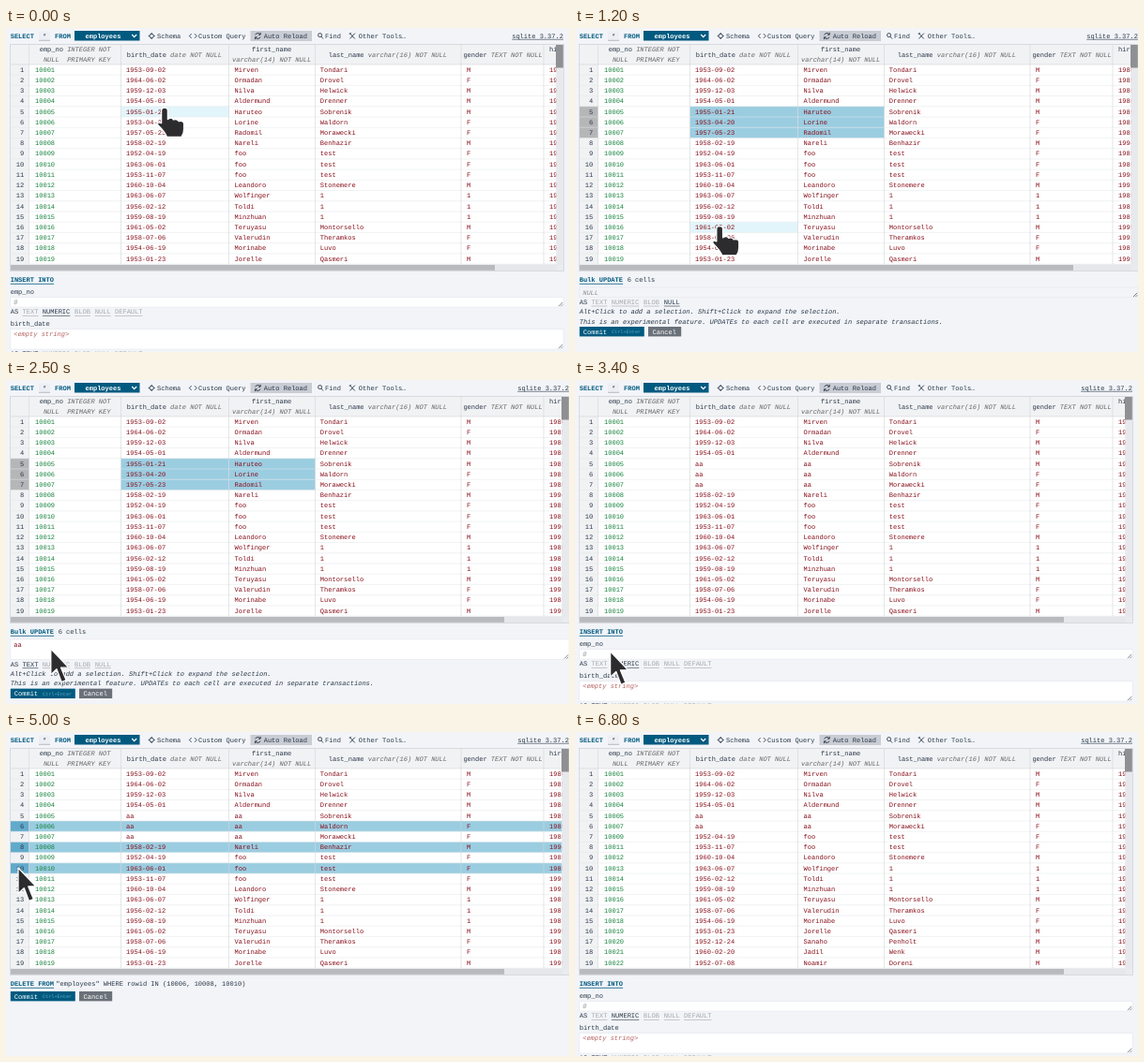
Animation of 600 by 346 pixels, one loop 6850 ms. Source, as an HTML page:

```html
<!DOCTYPE html>
<html lang="en">
<head>
<meta charset="utf-8">
<style>
html, body { margin: 0; width: 100%; height: 100%; overflow: hidden; background: #f2f4f8; }
svg { display: block; width: 600px; height: 346px; }
text { font: 7.03px "Liberation Mono", monospace; text-rendering: geometricPrecision; fill: #273646; white-space: pre; }
.b { font-weight: bold; }
.i { font-style: italic; }
.teal { fill: #005a7f; }
.white { fill: #fff; }
.num { fill: #14803c; }
.str { fill: #850d18; }
.type { fill: #666; font-style: italic; }
.off { fill: #a3a7ad; }
.hint { fill: #8a8f96; font-style: italic; }
.empty { fill: #b3605f; font-style: italic; }
.key { fill: #62a5c2; font-size: 5.2px; }
.icon { fill: none; stroke: #273646; stroke-width: .9; }
</style>
</head>
<body>
<svg viewBox="0 0 600 346">
  <defs><clipPath id="clip"><rect id="clipBox" x="5" y="18" height="235"/></clipPath></defs>
  <g id="scene"></g>
  <g id="cursor" stroke="#fff" stroke-width="1.3" stroke-linejoin="round" fill="#2c2c2e"><path/></g>
</svg>
<script>
const LOOP = 6850, CHAR = 4.22, TOP = 38.9, PITCH = 11.22, ROWS = 19;
const scene = document.getElementById('scene');
const cursor = document.getElementById('cursor');
const clipBox = document.getElementById('clipBox');

const edges = [24.5, 122.5, 237.5, 329.5, 485, 573, 660];
const textX = [31, 128, 243.6, 334.8, 491, 579];
const people = `10001 1953-09-02 Mirven Tondari M 1986
10002 1964-06-02 Ormadan Drovel F 1985
10003 1959-12-03 Nilva Helwick M 1986
10004 1954-05-01 Aldermund Drenner M 1986
10005 1955-01-21 Haruteo Sobrenik M 1989
10006 1953-04-20 Lorine Waldorn F 1989
10007 1957-05-23 Radomil Morawecki F 1989
10008 1958-02-19 Nareli Benhazir M 1994
10009 1952-04-19 foo test F 1985
10010 1963-06-01 foo test F 1989
10011 1953-11-07 foo test F 1990
10012 1960-10-04 Leandoro Stonemere M 1992
10013 1963-06-07 Wolfinger 1 1 1985
10014 1956-02-12 Toldi 1 1 1987
10015 1959-08-19 Minzhuan 1 1 1987
10016 1961-05-02 Teruyasu Montorsello M 1995
10017 1958-07-06 Valerudin Theramkos F 1993
10018 1954-06-19 Morinabe Luvo F 1987
10019 1953-01-23 Jorelle Qasmeri M 1999
10020 1952-12-24 Sanaho Penholt M 1999
10021 1960-02-20 Jadil Wenk M 1988
10022 1952-07-08 Noamir Doreni M 1995`.split('\n').map(line => line.split(' '));

// Moments at which the interface changes
const AT = { press: 150, bulk: 300, text: 1800, key1: 2350, key2: 2500, commit: 3200, del: 3950, remove: 5650 };
const picks = [[AT.del, '10006'], [4450, '10008'], [4850, '10010']];

const path = [
  [0, 169, 86], [150, 169, 86], [600, 316, 111], [850, 316, 111], [1500, 27, 292], [1900, 27, 292],
  [2100, 48, 285], [2450, 48, 285], [2850, 43, 333], [3230, 43, 333], [3850, 14, 101], [4080, 14, 101],
  [4350, 14, 123], [4520, 14, 123], [4780, 13, 145], [5030, 13, 145], [5420, 57, 285], [5700, 57, 285], [6200, -30, 312]
];
const ARROW = 'M0 0V27.5L6.2 21.6 11.4 35.5 16.4 33.4 10.8 20H19Z';
const HAND = 'M-3.4 2.6Q-3.4-.8 0-.8 3.4-.8 3.4 2.6V11.5Q7-9.2 7 10.5 9 9.6 9.4 12 13.6 10.4 15 13.6 20 12.4 20.6 16V22Q20.6 27 18 30.5H2.5Q.5 25-7 17.8-8.6 13.4-3.4 15.6Z'.replace('Q7-9.2 7 10.5 9 9.6 9.4 12', 'Q8 8.6 9.4 12');

function pointer(t) {
  const n = path.findIndex(p => p[0] > t);
  if (n < 0) return path[path.length - 1].slice(1);
  const a = path[n - 1], b = path[n], u = (t - a[0]) / (b[0] - a[0]), s = u * u * (3 - 2 * u);
  return [1, 2].map(k => a[k] + (b[k] - a[k]) * s);
}

const escape = s => s.replace(/&/g, '&amp;').replace(/</g, '&lt;');
// y is the middle of the capital letters
const text = (x, y, s, cls = '', extra = '') => `<text x="${x}" y="${y + 2.3}" class="${cls}" ${extra}>${escape(s)}</text>`;
const rect = (x, y, w, h, fill, extra = '') => `<rect x="${x}" y="${y}" width="${w}" height="${h}" fill="${fill}" ${extra}/>`;
const line = (x1, y1, x2, y2, color, w = .6) => `<path d="M${x1} ${y1}L${x2} ${y2}" stroke="${color}" stroke-width="${w}"/>`;
const icon = d => `<path class="icon" d="${d}"/>`;

function toolbar(W) {
  return text(4.7, 8.3, 'SELECT', 'b teal') + rect(35, 3.5, 12, 9.7, '#eceff4') + line(35, 13.3, 47, 13.3, '#8b939d')
    + text(39, 8.8, '*') + text(52, 8.3, 'FROM', 'b teal')
    + rect(73, 3, 69.5, 10.5, '#005a7f') + text(84.5, 8.3, 'employees', 'b white')
    + '<path d="M134.2 7L136.7 9.6 139.2 7" fill="none" stroke="#fff" stroke-width="1.2"/>'
    + rect(260.5, 3, 65.5, 11, '#c9ccd3')
    + icon('M153 8.5a2.2 2.2 0 1 0 4.4 0a2.2 2.2 0 1 0-4.4 0M155.2 5v1.2M155.2 10.8V12M151.7 8.5h1.2M157.5 8.5h1.2')
    + text(161, 8.3, 'Schema')
    + icon('M197.6 6.2L195.4 8.5 197.6 10.8M201 6.2L203.2 8.5 201 10.8') + text(205, 8.3, 'Custom Query')
    + icon('M265.7 7.4A2.9 2.9 0 0 1 271 7M271.2 4.8V7.2H268.9M271 9.6A2.9 2.9 0 0 1 265.7 10M265.5 12.2V9.8H267.8')
    + text(274.7, 8.3, 'Auto Reload')
    + icon('M332.6 7.6a2 2 0 1 0 4 0a2 2 0 1 0-4 0M336 9.2L338 11.5') + text(340, 8.3, 'Find')
    + icon('M366.3 5.5L371.7 11.5M371.9 5.6L366.5 11.4M366 6.8L367.7 5') + text(375.8, 8.3, 'Other Tools…')
    + text(W - 54.8, 8.3, 'sqlite 3.37.2') + line(W - 54.8, 12.3, W, 12.3, '#273646');
}

const heading = (x, y, name, type) =>
  `<text x="${x}" y="${y + 2.3}">${name}<tspan class="type">${type}</tspan></text>`;

function table(s) {
  const { W, rows, sel, hover } = s, right = W - 7.5, bottom = TOP + ROWS * PITCH;
  let out = rect(5, 18, right - 5, bottom - 18, '#fff') + rect(5, 18, right - 5, TOP - 18, '#f1f2f4')
    + rect(5, TOP, 19.5, bottom - TOP, '#f1f2f4');
  const cell = (r, c, fill) => rect(edges[c], TOP + r * PITCH, edges[c + 1] - edges[c], PITCH, fill);
  if (hover) out += cell(...hover, '#e2f5fa');
  if (sel) {
    for (let r = sel.r0; r <= sel.r1; r++) for (let c = 1; c <= sel.c1; c++) out += cell(r, c, '#9bcde1');
    out += rect(5, TOP + sel.r0 * PITCH, 19.5, (sel.r1 - sel.r0 + 1) * PITCH, '#b5b6b8');
  }
  rows.forEach((row, r) => {
    if (!s.picked.includes(row[0])) return;
    const y = TOP + r * PITCH;
    out += rect(24.5, y, right, PITCH, '#9bcde1') + rect(5, y, 19.5, PITCH, '#62aacb');
  });
  for (let r = 0; r <= ROWS; r++) out += line(5, TOP + r * PITCH, right, TOP + r * PITCH, r ? '#e3e4e6' : '#c9cbd0', .5);
  edges.forEach(x => out += line(x, 18, x, bottom, '#d3d5d9'));
  out += heading(35.7, 23, 'emp_no', ' INTEGER NOT') + heading(39.9, 34, '', 'NULL\u00a0 PRIMARY KEY')
    + heading(128.8, 29, 'birth_date', ' date NOT NULL')
    + heading(262, 23, 'first_name', '') + heading(241, 34, '', 'varchar(14) NOT NULL')
    + heading(343.7, 29, 'last_name', ' varchar(16) NOT NULL')
    + heading(487.4, 29, 'gender', ' TEXT NOT NULL') + heading(579, 23, 'hire_date', '');
  rows.forEach((row, r) => {
    const y = TOP + (r + .5) * PITCH - .1;
    out += text(19.2, y, String(r + 1), '', 'text-anchor="end"');
    row.forEach((value, c) => out += text(textX[c], y, value, c ? 'str' : 'num'));
  });
  return rect(4.5, 17.5, W - 4, 242, '#e9ebef', 'stroke="#d2d5db" stroke-width=".8"')
    + `<g clip-path="url(#clip)">${out}</g>`
    + rect(5, 253, right - 5, 5.8, '#e6e7ea') + rect(5, 253, W < 600 ? 516 : 526, 5.8, '#b9babd')
    + rect(right, 18, 7.5, 235, '#e8e9ec') + rect(right - .5, 18, 7.8, 24.5, '#8f9093');
}

function field(y, h, W, value, cls, fill = '#fff') {
  const b = y + h;
  return rect(4.8, y, W - 4.8, h, fill, 'stroke="#e1e4e9" stroke-width=".5"')
    + text(8.2, y + 5.4, value, cls)
    + icon(`M${W - 5} ${b - .8}L${W - .8} ${b - 5}M${W - 2.6} ${b - .8}L${W - .8} ${b - 2.6}`).replace('/>', ' style="stroke-width:.6"/>');
}

function types(y, active, names, hot) {
  const xs = [17.5, 38.8, 73, 94.8, 116];
  return text(4.7, y, 'AS') + names.map((name, k) => {
    const w = name.length * CHAR, on = name === active;
    return (hot && !k ? rect(xs[k] - .5, y - 4.5, w + 1, 9.5, '#c6dfea') : '')
      + text(xs[k], y, name, on ? '' : 'off') + line(xs[k], y + 4.4, xs[k] + w, y + 4.4, on ? '#273646' : '#a3a7ad');
  }).join('');
}

const title = s => text(4.7, 268.5, s, 'b teal') + line(4.7, 273.3, 4.7 + s.length * CHAR, 273.3, '#005a7f', .8);

const buttons = y => rect(4.8, y, 69, 10.4, '#005a7f') + text(8.8, y + 5.2, 'Commit', 'white')
  + text(39, y + 4.8, 'Ctrl+Enter', 'key') + rect(78, y, 35.2, 10.4, '#6b7179') + text(82.6, y + 5.2, 'Cancel', 'white');

function panel(s) {
  const { W } = s, kinds = ['TEXT', 'NUMERIC', 'BLOB', 'NULL'];
  if (s.view === 'insert') {
    const all = [...kinds, 'DEFAULT'];
    return title('INSERT INTO') + text(4.7, 282, 'emp_no') + field(287.5, 10.5, W, '0', 'hint') + types(303, 'NUMERIC', all)
      + text(4.7, 316, 'birth_date') + field(321.7, 21.3, W, '<empty string>', 'empty') + types(347.3, 'TEXT', all);
  }
  if (s.view === 'delete')
    return title('DELETE FROM') + text(53.3, 268.5, `"employees" WHERE rowid IN (${s.picked.join(', ')})`) + buttons(277);
  const d = s.asText ? 10.6 : 0;
  const box = !s.asText ? field(277, 10.8, W, 'NULL', 'hint', '#f2f4f8')
    : field(277, 21.4, W, s.typed || '<empty string>', s.typed ? 'str' : 'empty');
  return title('Bulk UPDATE') + text(55.7, 268.5, s.count + ' cells') + box
    + types(292.6 + d, s.asText ? 'TEXT' : 'NULL', kinds, s.hot)
    + text(4.7, 302.8 + d, 'Alt+Click to add a selection. Shift+Click to expand the selection.', 'i')
    + text(4.7, 313.4 + d, 'This is an experimental feature. UPDATEs to each cell are executed in separate transactions.', 'i')
    + buttons(319 + d);
}

function stateAt(t) {
  const [x, y] = pointer(t);
  const view = t < AT.bulk ? 'insert' : t < AT.commit ? 'update' : t < AT.del ? 'insert' : t < AT.remove ? 'delete' : 'insert';
  const s = { view, W: view === 'insert' ? 594 : 600, picked: [], asText: t >= AT.text };
  s.typed = t < AT.key1 ? '' : t < AT.key2 ? 'a' : 'aa';
  const rowAt = py => Math.floor((py - TOP) / PITCH);

  if (t >= AT.press && t < AT.commit) {
    const [ex, ey] = pointer(Math.min(t, 700));
    s.sel = { r0: 4, r1: Math.max(4, rowAt(ey)), c1: ex > edges[2] ? 2 : 1 };
    s.count = (s.sel.r1 - 3) * s.sel.c1;
  }
  if (view === 'delete') s.picked = picks.filter(p => t >= p[0]).map(p => p[1]);

  s.rows = people.map(p => t >= AT.commit && p[0] > '10004' && p[0] < '10008' ? [p[0], 'aa', 'aa', ...p.slice(3)] : p);
  if (t >= AT.remove) s.rows = s.rows.filter(p => !picks.some(k => k[1] === p[0]));
  s.rows = s.rows.slice(0, ROWS);

  const r = rowAt(y), inRows = r >= 0 && r < ROWS && x > 5 && x < s.W - 8;
  const c = edges.findIndex((e, k) => x >= e && x < edges[k + 1]);
  const selected = inRows && (s.picked.includes(s.rows[r][0])
    || s.sel && c > 0 && c <= s.sel.c1 && r >= s.sel.r0 && r <= s.sel.r1);
  const dragging = t >= AT.press && t < 850;
  const free = inRows && !selected && !dragging;
  if (free && c >= 0) s.hover = [r, c];

  const buttonY = view === 'delete' ? 277 : s.asText ? 329.6 : 319;
  const onButton = view !== 'insert' && x > 5 && x < 74 && y >= buttonY && y < buttonY + 10.4;
  const typeY = s.asText ? 303.2 : 292.6;
  s.hot = view === 'update' && x > 17 && x < 35 && Math.abs(y - typeY) < 5;
  return { s, x, y, hand: free || onButton || s.hot };
}

let last = '';
function render(t) {
  const { s, x, y, hand } = stateAt(t), key = JSON.stringify(s);
  if (key !== last) {
    last = key;
    clipBox.setAttribute('width', s.W - 12.5);
    scene.innerHTML = rect(0, 0, 600, 346, '#f2f4f8') + toolbar(s.W) + table(s) + panel(s);
  }
  cursor.setAttribute('transform', `translate(${x} ${y})`);
  cursor.firstElementChild.setAttribute('d', hand ? HAND : ARROW);
}

const start = performance.now();
function tick() {
  render((performance.now() - start) % LOOP);
  requestAnimationFrame(tick);
}
tick();
</script>
</body>
</html>
```
